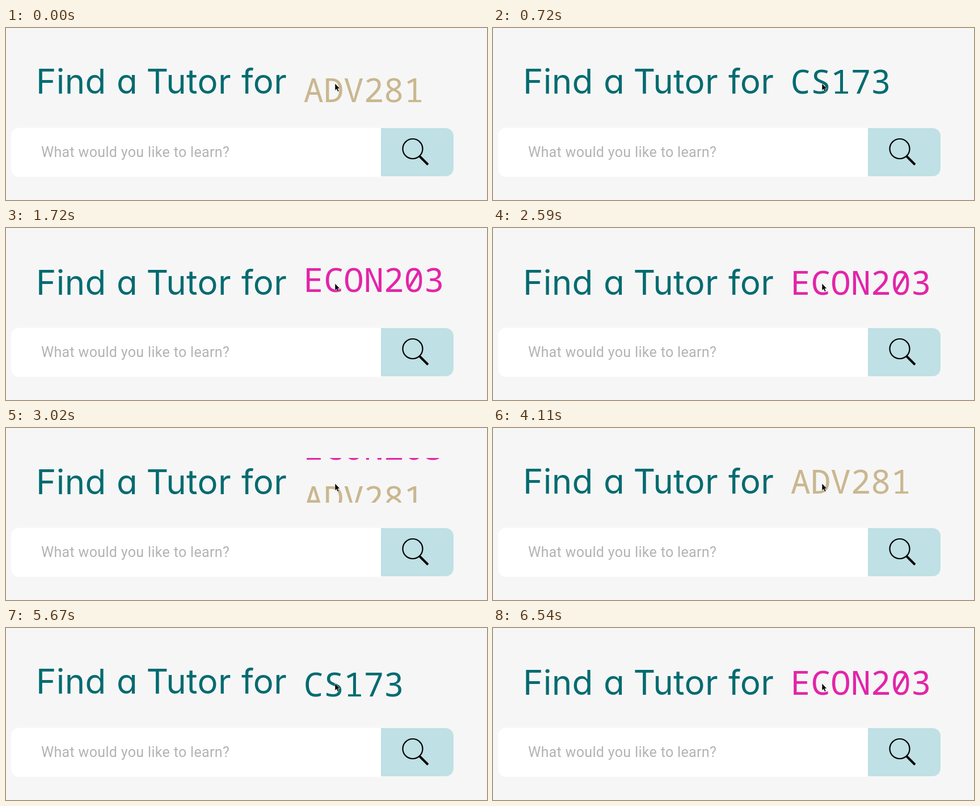
Write an HTML page that moves like this. It is 848 px wide and 304 px high and loops after 6.59 s.

```html
<!DOCTYPE html>
<html lang="en">
<head>
<meta charset="utf-8">
<title>Find a Tutor</title>
<style>
  html, body { margin: 0; height: 100%; overflow: hidden; background: #f6f6f6; }
  svg { display: block; width: 848px; height: 304px; }
  #head { font: 400 60px Inter, sans-serif; font-feature-settings: "cv11"; fill: #036b70; letter-spacing: .4px; }
  .code { font: 400 59px "Noto Sans Mono", monospace; }
  #hint { font: 400 25px Roboto, sans-serif; fill: #b3b3b3; letter-spacing: .33px; }
</style>
</head>
<body>
<svg viewBox="0 0 848 304">
  <clipPath id="slot"><rect x="500" y="53" width="348" height="79"/></clipPath>
  <text id="head"><tspan x="53">Find</tspan><tspan x="195">a</tspan><tspan x="247.5">Tutor</tspan><tspan x="415">for</tspan></text>
  <g clip-path="url(#slot)">
    <text class="code" id="out" x="524.5"/>
    <text class="code" id="in" x="524.5"/>
  </g>
  <path d="M661 176.500H23a14 14 0 0 0-14 14V249a14 14 0 0 0 14 14H661z" fill="#fff"/>
  <path d="M661 177H775a14 14 0 0 1 14 14V248a14 14 0 0 1-14 14H661z" fill="#bfe0e4"/>
  <text id="hint" x="62" y="228">What would you like to learn?</text>
  <g fill="none" stroke="#000">
    <circle cx="717" cy="213.500" r="17.500" stroke-width="2.200"/>
    <path d="M729.5 227L744 241.500" stroke-width="4"/>
  </g>
  <path d="M580 98v12.500l2.800-2.600 2 4.600 2.200-1-2-4.400h3.600z" fill="#000" stroke="#fff" stroke-width=".6"/>
</svg>
<script>
const LOOP = 6590, PERIOD = 1448.75, MOVE = 500, START = -150, STEP = 91;
const words = [
  { text: "ADV281", color: "#cab78f", base: 116 },
  { text: "CS173", color: "#036b70", base: 116 },
  { text: "ECON203", color: "#e324a9", base: 118 }
];
const $ = id => document.getElementById(id);
const clamp = v => Math.min(1, Math.max(0, v));
const bez = (a, b, s) => 3 * s * (1 - s) * ((1 - s) * a + s * b) + s ** 3;

// Dips back before leaving, overshoots on arrival
function ease(x) {
  let lo = 0, hi = 1;
  for (let i = 0; i < 24; i++) {
    const s = (lo + hi) / 2;
    if (bez(.68, .27, s) < x) lo = s; else hi = s;
  }
  return x <= 0 ? 0 : x >= 1 ? 1 : bez(-.83, 1.45, lo);
}

function place(el, word, shift) {
  el.textContent = word.text;
  el.setAttribute("fill", word.color);
  el.setAttribute("y", word.base + shift);
}

function draw(now) {
  const t = now % LOOP - START;
  const turn = Math.floor(t / PERIOD);
  const p = ease((t - turn * PERIOD) / MOVE);
  const from = words[turn % 3], to = words[(turn + 1) % 3];
  place($("out"), from, -STEP * p);
  place($("in"), to, STEP * (1 - p));
  $("head").setAttribute("y", from.base + (to.base - from.base) * clamp(p));
  requestAnimationFrame(draw);
}
draw(0);
</script>
</body>
</html>
```
